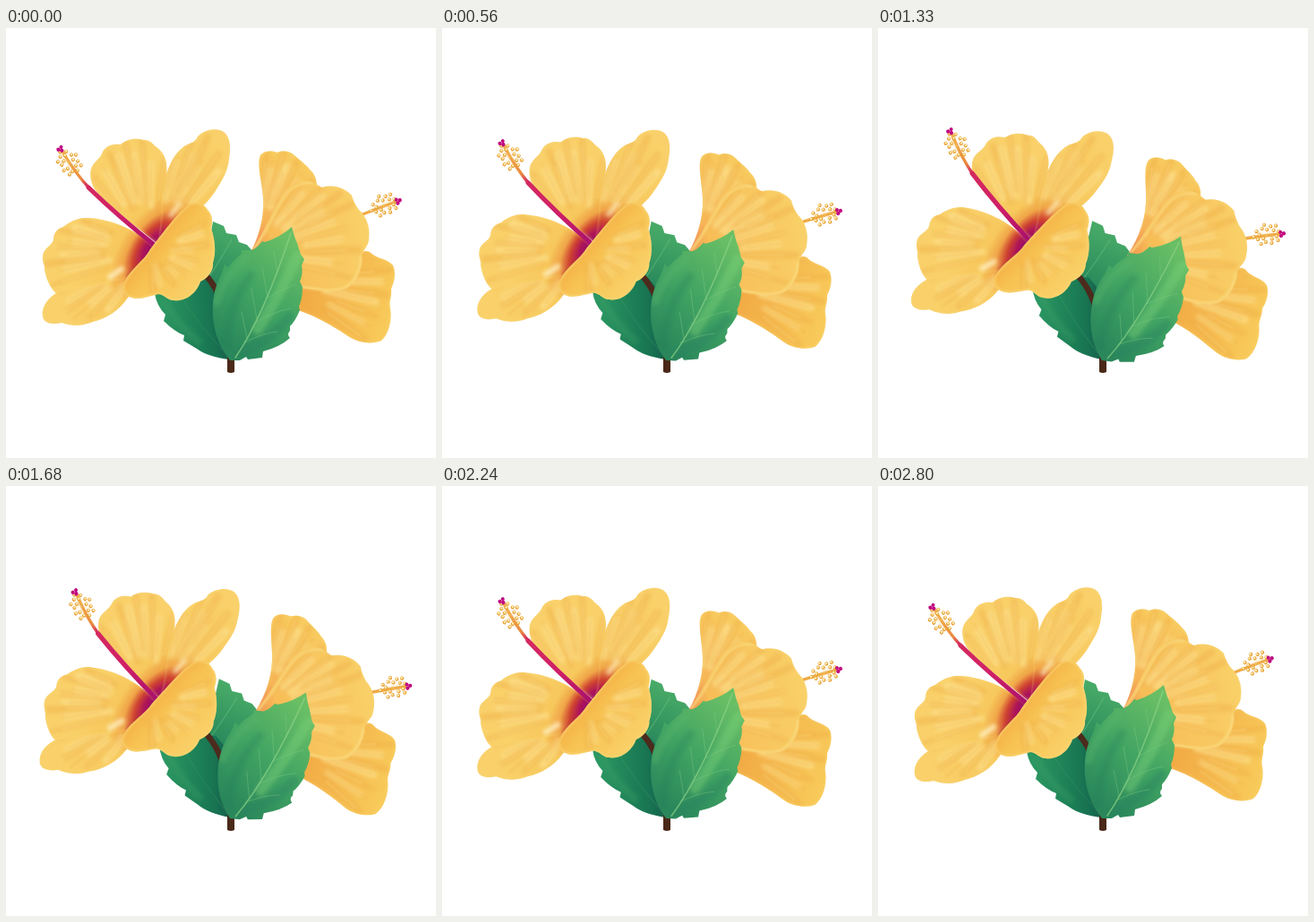
These frames come from a looping animation (480x480 px, 2870 ms). An HTML page:

```html
<!DOCTYPE html>
<html lang="en">
<head>
<meta charset="utf-8">
<title>Hibiscus</title>
<style>
html, body { margin: 0; width: 100%; height: 100%; overflow: hidden; background: #fff; }
svg { display: block; width: 100vw; height: 100vh; }
path, line { stroke-linecap: round; stroke-linejoin: round; }
</style>
</head>
<body>
<svg viewBox="0 0 480 480">
  <defs>
    <filter id="soft" x="-20%" y="-20%" width="140%" height="140%"><feGaussianBlur stdDeviation="2.2"/></filter>
    <filter id="fine" x="-20%" y="-20%" width="140%" height="140%"><feGaussianBlur stdDeviation=".9"/></filter>
    <radialGradient id="open" gradientUnits="userSpaceOnUse" cx="0" cy="0" r="135"
      gradientTransform="translate(165 245) rotate(-55) scale(1 .5)">
      <stop offset="0" stop-color="#8f0d6c"/><stop offset=".13" stop-color="#ae1458"/>
      <stop offset=".24" stop-color="#cf4430"/><stop offset=".36" stop-color="#f0a548"/>
      <stop offset=".52" stop-color="#f7c85c"/><stop offset="1" stop-color="#f9d06a"/>
    </radialGradient>
    <linearGradient id="lip" gradientUnits="userSpaceOnUse" x1="152" y1="235" x2="215" y2="285">
      <stop offset="0" stop-color="#f3a840"/><stop offset=".4" stop-color="#f7c353"/><stop offset="1" stop-color="#f9d067"/>
    </linearGradient>
    <linearGradient id="back" gradientUnits="userSpaceOnUse" x1="278" y1="248" x2="320" y2="145">
      <stop offset="0" stop-color="#f0774f"/><stop offset=".3" stop-color="#f6b456"/><stop offset="1" stop-color="#f8cb5f"/>
    </linearGradient>
    <linearGradient id="side" gradientUnits="userSpaceOnUse" x1="276" y1="250" x2="400" y2="215">
      <stop offset="0" stop-color="#f19350"/><stop offset=".18" stop-color="#f7bd57"/><stop offset="1" stop-color="#f9d068"/>
    </linearGradient>
    <linearGradient id="low" gradientUnits="userSpaceOnUse" x1="330" y1="300" x2="425" y2="330">
      <stop offset="0" stop-color="#f2aa44"/><stop offset="1" stop-color="#f8ca5a"/>
    </linearGradient>
    <linearGradient id="style" gradientUnits="userSpaceOnUse" x1="168" y1="244" x2="64" y2="138">
      <stop offset="0" stop-color="#a60f6b"/><stop offset=".35" stop-color="#cf2068"/>
      <stop offset=".69" stop-color="#d42a5f"/><stop offset=".76" stop-color="#eb8a3f"/><stop offset="1" stop-color="#f2b04a"/>
    </linearGradient>
    <linearGradient id="leaf" gradientUnits="userSpaceOnUse" x1="240" y1="350" x2="322" y2="240">
      <stop offset="0" stop-color="#2a875b"/><stop offset=".5" stop-color="#43a563"/><stop offset="1" stop-color="#6abf65"/>
    </linearGradient>
    <linearGradient id="dark" gradientUnits="userSpaceOnUse" x1="172" y1="325" x2="245" y2="320">
      <stop offset="0" stop-color="#2d9862"/><stop offset=".6" stop-color="#1b7d55"/><stop offset="1" stop-color="#16694f"/>
    </linearGradient>
    <linearGradient id="upper" gradientUnits="userSpaceOnUse" x1="235" y1="285" x2="258" y2="225">
      <stop offset="0" stop-color="#2a8a5c"/><stop offset="1" stop-color="#4aac68"/>
    </linearGradient>
  </defs>
  <g id="upperLeaf"></g>
  <g id="lowerLeaf"></g>
  <path d="M251 381C250 348 250 306 223 276" fill="none" stroke="#4c2b1d" stroke-width="6.5"/>
  <path d="M247 360H255V384Q251 386 247 384Z" fill="#4a2919"/>
  <g id="right"><g id="rightPistil"></g><g id="rightPetals"></g></g>
  <g id="left"></g>
  <g id="leftPistil"></g>
  <g id="leftLip"></g>
  <g id="front"></g>
</svg>
<script>
const $ = id => document.getElementById(id);
const LIGHT = '#fde493', DEEP = '#eeac43';
let seed = 7, clips = 0;
const rand = (lo, hi) => {
  seed = seed * 16807 % 2147483647;
  return lo + (hi - lo) * seed / 2147483647;
};
const line = (d, color, width, opacity = 1) =>
  `<path d="${d}" fill="none" stroke="${color}" stroke-width="${width}" opacity="${opacity}"/>`;

// A filled outline with soft strokes clipped to it.
function shape(d, fill, inner) {
  const id = 'c' + clips++;
  return `<clipPath id="${id}"><path d="${d}"/></clipPath><path d="${d}" fill="${fill}"/>
    <g clip-path="url(#${id})">${inner}</g>`;
}

// Streaks fan out from the base towards a curved rim (start, control, end).
function petal(d, fill, [bx, by], [x1, y1, cx, cy, x2, y2], n, glow = .25) {
  let soft = '', fine = '';
  for (let i = 0; i < n; i++) {
    const u = (i + rand(.3, .7)) / n, v = 1 - u;
    const x = v * v * x1 + 2 * u * v * cx + u * u * x2;
    const y = v * v * y1 + 2 * u * v * cy + u * u * y2;
    const at = k => `${(bx + (x - bx) * k).toFixed(1)} ${(by + (y - by) * k).toFixed(1)}`;
    const pale = i % 2;
    soft += line(`M${at(rand(.38, .55))}L${at(pale ? rand(.75, .9) : rand(.9, 1.05))}`,
      pale ? LIGHT : DEEP, rand(4, 8), pale ? .65 : .42);
    fine += line(`M${at(rand(.4, .6))}L${at(rand(.8, .98))}`, pale ? DEEP : LIGHT, 1.3, .45);
  }
  return shape(d, fill, `<g filter="url(#soft)">${soft}</g>
    <g filter="url(#fine)">${fine}${line(d, '#fbd978', 3, glow)}</g>`);
}

// Pollen dots spread in a spiral around the end of a pistil.
function pollen(x, y, tilt) {
  let dots = '';
  for (let i = 1; i < 19; i++) {
    const a = i * 2.4, r = Math.sqrt(.12 + .88 * i / 18);
    const px = Math.cos(a) * r * 15.5, py = Math.sin(a) * r * 12.5;
    dots += `<line x2="${px * .9}" y2="${py * .9}" stroke="#f3c264" stroke-width=".5" opacity=".4"/>
      <circle cx="${px}" cy="${py}" r="2.1" fill="#e7a137"/>
      <circle cx="${px - .3}" cy="${py - .4}" r="1.2" fill="#fff0b5"/>`;
  }
  return `<g transform="translate(${x} ${y}) rotate(${tilt})">${dots}</g>`;
}
const stigma = (x, y, tilt) => `<g transform="translate(${x} ${y}) rotate(${tilt})" fill="#c1087f">
  <circle cx="-1.8" r="2.2"/><circle cx="1.6" cy="-2" r="2.1"/><circle cx="1.5" cy="2.2" r="2"/></g>`;

$('upperLeaf').innerHTML = shape(
  'M231 216L243 221 246 229 257 231 260 239 269 242 276 250 270 290 235 300 218 288Z', 'url(#upper)',
  line('M222 285Q240 258 252 236', '#6dc181', 1.2, .5));
$('lowerLeaf').innerHTML = shape(
  'M250 370Q225 367 213 358L198 349 199 343Q188 339 176 327L178 320Q168 310 166 296L200 282 228 280 256 310Z', 'url(#dark)',
  `<g filter="url(#soft)">${line('M238 290Q236 330 247 366', '#155c4d', 12, .4)}${line('M178 306Q190 330 215 350', '#3ba169', 8, .35)}</g>`
  + line('M245 363Q218 335 195 300', '#46a172', 1, .3));

$('front').innerHTML = shape(
  'M250 371Q233 350 231 322Q229 296 240 276L244 264 248 267Q254 259 263 252L263 248 274 248Q280 246 286 238L289 239Q307 233 319 222Q322 234 325 240L329 253 333 258 330 265Q332 274 328 283L331 289Q331 302 327 311L328 315Q323 327 317 333L317 338Q313 342 317 346Q306 356 287 361L286 368 270 370 268 367 261 371Z',
  'url(#leaf)', `<g filter="url(#soft)">
  ${line('M235 306Q241 281 268 257', '#58b56d', 9, .4)}${line('M246 354Q248 310 273 276', '#237c5b', 9, .28)}
  ${line('M281 336Q305 300 325 255', '#7bd075', 12, .45)}${line('M267 360Q300 346 316 322', '#258060', 11, .4)}</g>
  ${line('M256 368Q287 323 318 229', '#8dd386', 1.5, .7)}
  ${line('M269 346L263 317M280 325L274 291M292 300L286 268M303 274L299 249M266 351Q288 340 303 339M278 329Q300 316 318 313M291 302Q309 291 324 286', '#83ca83', 1, .4)}`);

const heart = [162, 249];
$('left').innerHTML =
  petal('M172 243C154 228 112 198 99 180C93 170 93 158 97 153C101 147 105 146 108 138C113 130 121 129 128 130C137 123 146 123 153 125C161 124 164 130 168 133C177 139 181 150 179 165C176 190 181 215 176 242Z',
    'url(#open)', heart, [92, 165, 125, 98, 182, 145], 9) +
  petal('M165 250C176 227 171 195 176 177C179 158 187 140 199 132C205 128 211 129 214 121C222 113 236 111 243 116C251 122 251 135 249 146C248 160 241 170 235 180C228 192 216 203 202 214Z',
    'url(#open)', heart, [182, 142, 225, 100, 249, 153], 8) +
  petal('M165 264C118 273 88 286 59 294C47 301 39 311 41 322C42 331 55 331 62 329C75 334 88 332 97 328C111 325 127 315 136 301L165 275Z',
    'url(#open)', heart, [50, 294, 46, 341, 122, 322], 6) +
  petal('M169 247C145 224 116 213 91 212C80 211 70 217 64 222C57 224 53 229 53 236C52 243 42 245 41 254C40 262 44 265 43 270C45 281 50 291 56 296C88 289 122 281 150 278Z',
    'url(#open)', heart, [83, 210, 35, 235, 53, 292], 9) +
  `<g filter="url(#soft)">${line('M116 278L129 269', '#fff3c6', 6, .8)}${line('M184 209L193 197', '#fff3c6', 5, .7)}
    ${line('M137 278L150 262', '#a82a3a', 5, .6)}${line('M149 281L165 258', '#930e68', 8, .8)}</g>`;

$('leftLip').innerHTML =
  petal('M161 247C178 225 192 205 206 196C214 193 222 197 225 203C231 209 231 217 229 224C233 235 235 250 231 262C232 270 226 279 217 283C213 296 200 306 187 304C180 304 178 298 170 297C160 299 150 304 140 301C130 298 129 288 133 282C139 269 154 260 161 247Z',
    'url(#lip)', [160, 248], [226, 211, 232, 282, 158, 300], 11, .7);

$('leftPistil').innerHTML =
  line('M168 244Q126 211 92 178', 'url(#style)', 5.2) +
  line('M94 180Q78 163 63 138', 'url(#style)', 3.4) +
  pollen(70, 150, 52) + stigma(61, 135.5, -135);

$('rightPistil').innerHTML =
  line('M345 231Q395 208 435 194', '#efaa46', 3.4) + pollen(422, 198, -21) + stigma(438, 193, 155);

$('rightPetals').innerHTML =
  petal('M274 249C284 228 290 205 286 180C284 165 280 150 284 142C289 136 298 137 303 139C310 136 318 138 322 142C328 148 335 152 339 158C344 162 347 168 347 178L300 235Z',
    'url(#back)', [276, 248], [287, 140, 318, 130, 347, 174], 7) +
  petal('M326 281C355 290 382 292 395 252Q400 247 406 250C413 258 426 257 432 265C436 275 433 285 430 291C431 300 427 305 429 313C431 325 428 341 419 349C410 353 395 352 385 346C370 336 350 323 326 315Z',
    'url(#low)', [310, 282], [428, 260, 446, 315, 398, 352], 7) +
  petal('M273 250C290 225 297 205 306 190C312 178 325 168 338 171C345 172 348 176 353 178C366 174 379 179 386 187C388 194 390 197 394 203C402 210 407 222 405 236C405 243 398 248 397 255C398 269 392 281 381 290C366 296 345 292 330 290C310 282 295 264 273 250Z',
    'url(#side)', [274, 252], [324, 172, 410, 170, 386, 288], 13) +
  `<g filter="url(#fine)">${line('M277 246C293 225 300 205 309 191C315 180 327 172 341 173M330 289C347 292 365 295 380 289C391 280 396 269 396 256', '#fbdc82', 2.4, .8)}</g>`;

const STEP = 70, FRAMES = 41, HALF = 20;
const move = (id, value) => $(id).setAttribute('transform', value);
const turn = (id, angle, x, y) => move(id, `rotate(${angle} ${x} ${y})`);

function draw(now) {
  const n = Math.floor(now / STEP) % FRAMES;
  const u = 1 - Math.abs(n - HALF) / HALF;
  const p = u * (.3 + u * (1.5 - .8 * u));
  turn('upperLeaf', 3.2 * p, 250, 370);
  turn('lowerLeaf', 5 * p, 250, 370);
  turn('front', 8 * p, 250, 370);
  turn('left', 5.6 * p, 217, 272);
  turn('leftLip', 5.6 * p, 217, 272);
  move('leftPistil', `translate(${2.5 * p} ${-5.5 * p}) rotate(${9 * p} 168 244)`);
  turn('right', 7.1 * p, 243, 294);
  turn('rightPistil', 6.9 * p, 330, 235);
}

let start;
function tick(now) {
  start ??= now;
  draw(now - start);
  requestAnimationFrame(tick);
}
draw(0);
requestAnimationFrame(tick);
</script>
</body>
</html>
```
